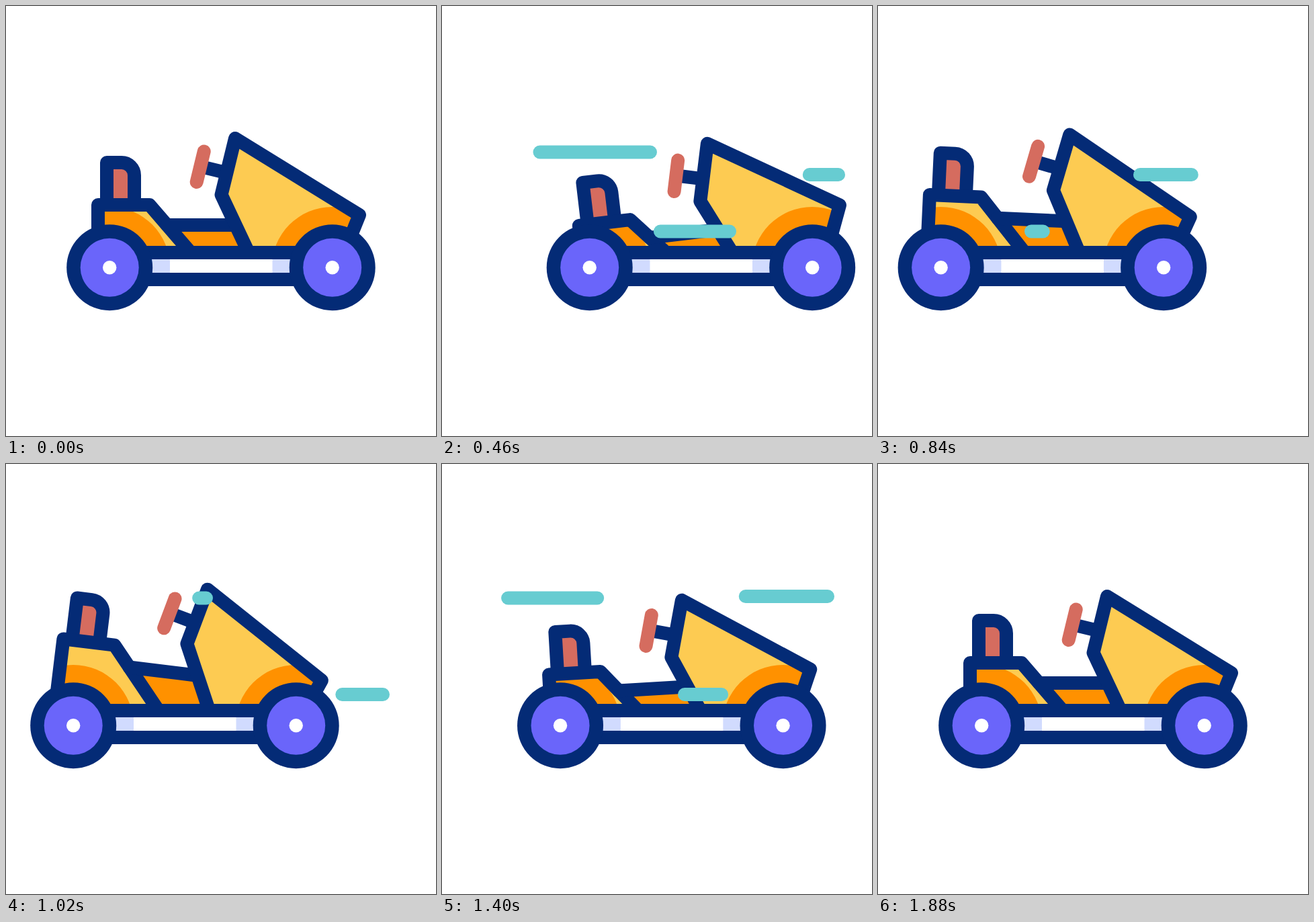
Write an HTML page that moves like this. It is 640 px wide and 640 px high and loops after 2420 ms.

```html
<!DOCTYPE html>
<html lang="en">
<head>
<meta charset="utf-8">
<title>Kart</title>
<style>
  html, body { margin: 0; width: 100%; height: 100%; overflow: hidden; background: #fff; }
  svg { display: block; width: 100vw; height: 100vh; }
  .ink { fill: none; stroke: #042b76; stroke-width: 20; stroke-linejoin: round; stroke-linecap: round; }
  .navy { fill: #042b76; }
  .yellow { fill: #fdcb52; }
  .orange { fill: #ff9100; }
  .violet { fill: #6a65fa; }
  .pale { fill: #d1dbfe; }
  .white { fill: #fff; }
  .grip { stroke: #d56c5f; }
  #streaks { stroke: #67ccd1; stroke-width: 20; stroke-linecap: round; }
</style>
</head>
<body>
<svg viewBox="0 0 640 640">
  <defs>
    <clipPath id="aboveFrame"><rect x="0" y="0" width="640" height="367"/></clipPath>
    <clipPath id="rearClip"><polygon class="tilt" points="137,296 213.6,296 338,440 137,440"/></clipPath>
    <clipPath id="noseClip"><polygon class="tilt" points="341,197 526,311 490,400 386,420 320.5,281"/></clipPath>
  </defs>
  <g id="car">
    <g clip-path="url(#aboveFrame)">
      <g class="tilt">
        <path fill="#d56c5f" d="M150 296V233H172A19 19 0 0 1 191 252V296Z"/>
        <path class="ink" d="M150 296V233H172A19 19 0 0 1 191 252V296"/>
        <path class="ink" d="M290 239L325 247.5"/>
        <path class="ink grip" d="M294.7 216.5L283.7 262"/>
        <polygon class="orange" points="239.5,326 341,326 386,420 320,420"/>
      </g>
      <g clip-path="url(#rearClip)">
        <rect class="yellow" width="640" height="640"/>
        <circle class="orange" cx="154" cy="389" r="90"/>
      </g>
      <g clip-path="url(#noseClip)">
        <rect class="yellow" width="640" height="640"/>
        <circle class="orange" cx="485.6" cy="389" r="90"/>
      </g>
      <g class="tilt ink">
        <path d="M137 440V296H213.6L338 440"/>
        <path d="M239.5 326H341"/>
        <path d="M386 420L320.5 281L341 197L526 311L490 400"/>
      </g>
    </g>
    <rect class="navy" x="154" y="357" width="332" height="60"/>
    <rect class="pale" x="154" y="377" width="332" height="20"/>
    <rect class="white" x="244" y="377" width="152.500" height="20"/>
    <g id="wheels"></g>
  </g>
  <g id="streaks"></g>
</svg>
<script>
const LOOP = 2420, STEP = 20;
const svgNS = "http://www.w3.org/2000/svg";

// [time, value] knots
const drive = [[0, 0], [220, 45], [400, 72], [540, 46], [680, -10], [910, -69], [1020, -54],
  [1080, -35], [1220, 13.3], [1325, 26], [1580, 2.3], [1620, 0.9], [1680, 0]];
const pitch = [[0, 0], [220, -2.5], [600, -8], [680, -6.4], [965, 7.4], [1020, 6.9],
  [1220, 1.9], [1470, -4.2], [1580, -3.35], [1880, 0]];
const heave = [[0, 0], [220, 0.5], [680, -1.7], [1020, -3.4], [1220, 5], [1580, -1.5], [1880, 0]];

// Speed streaks: y, right end, start time
const streaks = [[217.5, 341, 84], [335.5, 438, 228], [251, 600, 320],
  [343, 571, 851], [199.5, 308, 952], [197, 584, 1140]];
const LENGTH = 200, HEAD_TIME = 455, TAIL_DELAY = 293, TAIL_TIME = 395;

function add(parent, name, attrs) {
  const node = document.createElementNS(svgNS, name);
  for (const key in attrs) node.setAttribute(key, attrs[key]);
  return parent.appendChild(node);
}

const car = document.getElementById("car");
const tilted = document.querySelectorAll(".tilt");
const wheels = document.getElementById("wheels");
for (const cx of [154.2, 485.7]) {
  add(wheels, "circle", { class: "navy", cx, cy: 389.2, r: 64 });
  add(wheels, "circle", { class: "violet", cx, cy: 389.2, r: 43.5 });
  add(wheels, "circle", { class: "white", cx, cy: 389.2, r: 10.2 });
}
const lines = streaks.map(([y]) =>
  add(document.getElementById("streaks"), "line", { y1: y, y2: y }));

const ease = p => (1 - Math.cos(Math.PI * Math.min(1, Math.max(0, p)))) / 2;

// Slope at knot i: flat at ends and turning points
function slope(keys, i) {
  if (i === 0 || i === keys.length - 1) return 0;
  const [[t0, v0], [t1, v1], [t2, v2]] = keys.slice(i - 1, i + 2);
  const a = (v1 - v0) / (t1 - t0), b = (v2 - v1) / (t2 - t1);
  return a * b > 0 ? 2 * a * b / (a + b) : 0;
}

// Monotone cubic through the knots
function sample(keys, t) {
  const i = keys.findIndex(key => key[0] > t) - 1;
  if (i < 0) return keys[keys.length - 1][1];
  const [t0, v0] = keys[i], [t1, v1] = keys[i + 1];
  const d = t1 - t0, p = (t - t0) / d, q = 1 - p;
  return v0 * q * q * (1 + 2 * p) + v1 * p * p * (1 + 2 * q)
    + d * p * q * (slope(keys, i) * q - slope(keys, i + 1) * p);
}

function render(t) {
  car.setAttribute("transform", `translate(${sample(drive, t)} 0)`);
  const tilt = `translate(0 ${sample(heave, t)}) rotate(${sample(pitch, t)} 405 300)`;
  tilted.forEach(node => node.setAttribute("transform", tilt));
  streaks.forEach(([, right, start], i) => {
    const age = t - start;
    const visible = age > 0 && age < TAIL_DELAY + TAIL_TIME;
    lines[i].setAttribute("visibility", visible ? "visible" : "hidden");
    lines[i].setAttribute("x1", right - 10 - LENGTH * ease(age / HEAD_TIME));
    lines[i].setAttribute("x2", right - 10 - LENGTH * ease((age - TAIL_DELAY) / TAIL_TIME));
  });
}

const begin = performance.now();
function frame() {
  const t = (performance.now() - begin) % LOOP;
  render(Math.floor(t / STEP) * STEP);
  requestAnimationFrame(frame);
}
render(0);
requestAnimationFrame(frame);
</script>
</body>
</html>
```
